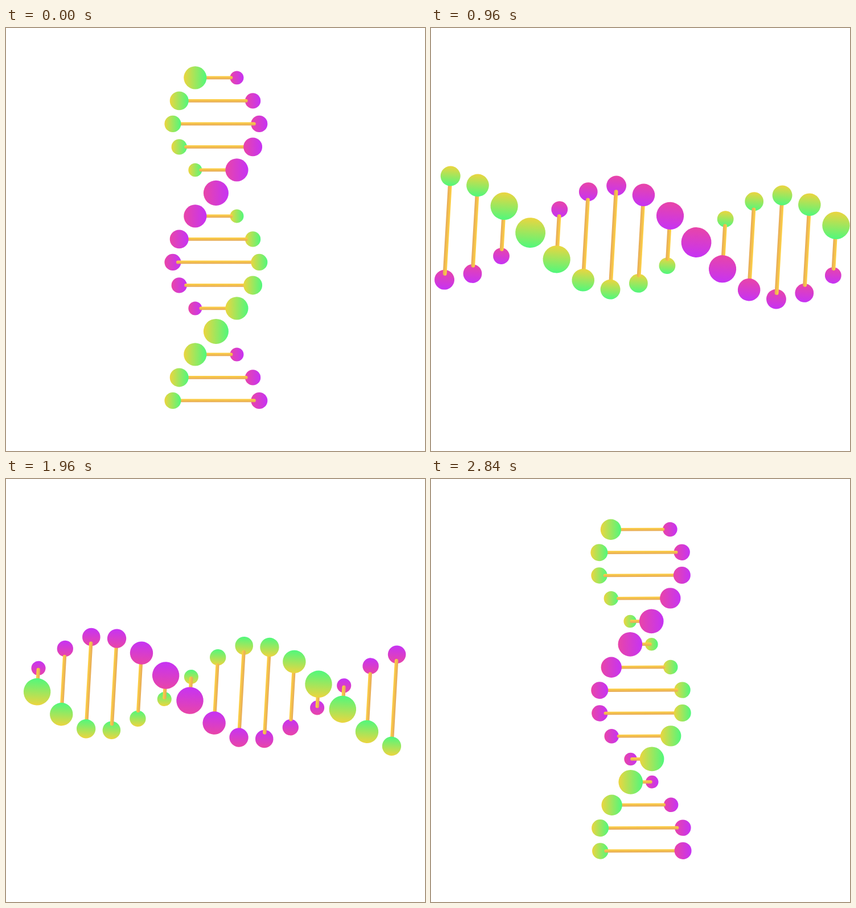
Animation of 736 by 743 pixels, one loop 2880 ms. Source, as an HTML page with a canvas:

```html
<!DOCTYPE html>
<html lang="en">
<head>
<meta charset="utf-8">
<title>Turning helix</title>
<style>
  html, body { margin: 0; width: 100%; height: 100%; overflow: hidden; background: #fff; }
  canvas { display: block; }
</style>
</head>
<body>
<canvas id="stage" width="736" height="743"></canvas>
<script>
const ctx = document.getElementById('stage').getContext('2d');

const LOOP = 2880, TICK = 40;
const CENTER = { x: 368.9, y: 370.9 };
const ROWS = 15, SPACING = 40;
const TURN = 24;                       // ticks per turn of the helix
const REACH = 75;                      // largest distance of a ball from the axis
const RADIUS = { side: 14.35, front: 21.75, back: 10.95 };
const BAR = { long: 69, short: 15, width: 5.6 };

const GREEN = ['#ecd53f', '#50f87c'];
const PURPLE = ['#e845a8', '#c633f4'];
const GOLD = ['#ffd243', '#e5a95a'];

const ease = u => u * u * (3 - 2 * u);
const mix = (a, b, u) => a + (b - a) * u;
const mod = (a, n) => ((a % n) + n) % n;
const pingPong = u => 1 - Math.abs(1 - mod(u, 2));

function gradient(x0, y0, x1, y1, [from, to]) {
  const g = ctx.createLinearGradient(x0, y0, x1, y1);
  g.addColorStop(0, from);
  g.addColorStop(1, to);
  return g;
}

// 0 at the sides of the turn, 1 at the very front or back
const depth = phase => ease(pingPong(phase / 6));

function drawBall(phase, y, colors) {
  const x = REACH * (2 * ease(pingPong(phase / 12)) - 1);
  const r = mix(RADIUS.side, phase >= 12 ? RADIUS.front : RADIUS.back, depth(phase));
  ctx.fillStyle = gradient(x - r, 0, x + r, 0, colors);
  ctx.beginPath();
  ctx.arc(x, y, r, 0, 2 * Math.PI);
  ctx.fill();
}

function drawBar(phase, y) {
  const half = mix(BAR.long, BAR.short, depth(phase)), h = BAR.width;
  ctx.fillStyle = gradient(0, y - h / 2, 0, y + h / 2, GOLD);
  ctx.beginPath();
  ctx.roundRect(-half, y - h / 2, 2 * half, h, h / 2);
  ctx.fill();
}

function drawRow(row, tick) {
  const y = (row - (ROWS - 1) / 2) * SPACING;
  const phase = mod(2 * (row - 2) - tick, TURN);
  const green = () => drawBall(phase, y, GREEN);
  const purple = () => drawBall(mod(phase + 12, TURN), y, PURPLE);
  const greenInFront = phase >= 12 || phase === 0;

  (greenInFront ? purple : green)();
  drawBar(phase, y);
  (greenInFront ? green : purple)();
}

function draw(now) {
  const tick = Math.floor(mod(now, LOOP) / TICK);
  const time = tick * TICK;
  const zoom = 1 + 0.24 * ease(pingPong((time + 200) / (LOOP / 2)));

  ctx.resetTransform();
  ctx.fillStyle = '#fff';
  ctx.fillRect(0, 0, 736, 743);
  ctx.translate(CENTER.x, CENTER.y);
  ctx.rotate(2 * Math.PI * ease(time / LOOP));
  ctx.scale(zoom, zoom);
  for (let row = 0; row < ROWS; row++) drawRow(row, tick);

  requestAnimationFrame(draw);
}

draw(0);
</script>
</body>
</html>
```
